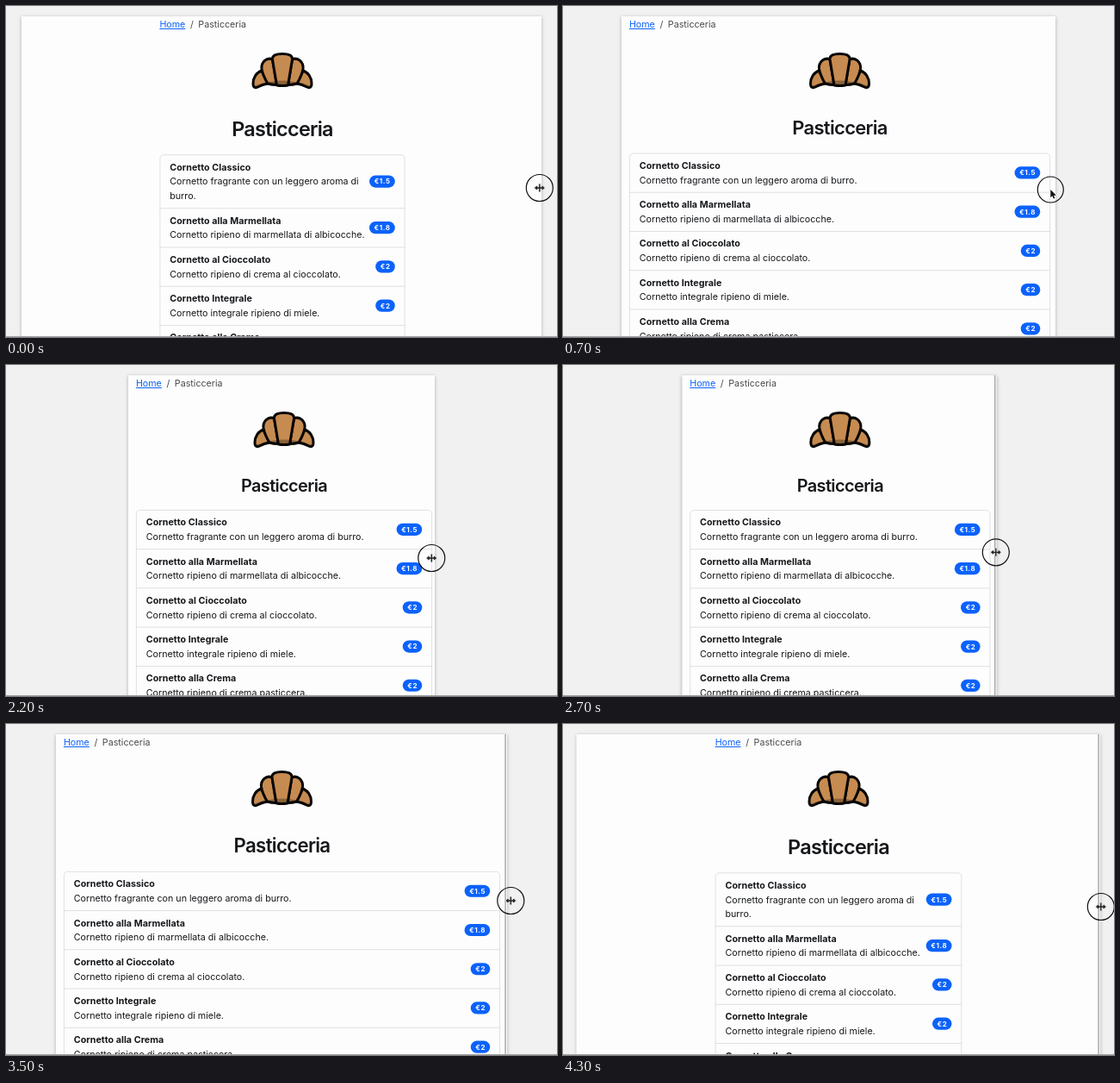
An HTML page with a canvas for the animation above (4.4 s loop, 640 by 384 pixels).

```html
<!DOCTYPE html>
<html lang="it">
<head>
<meta charset="utf-8">
<title>Pasticceria</title>
<style>
  html, body { margin: 0; width: 100%; height: 100%; overflow: hidden; background: #f1f1f1; }
  canvas { display: block; }
</style>
</head>
<body>
<canvas id="stage" width="640" height="384"></canvas>
<script>
const ctx = document.getElementById('stage').getContext('2d');
const LOOP = 4400, STEP = 100;
const SCALE = 0.696;               // page zoom: one CSS pixel of the page on stage
const rem = n => n * 16 * SCALE;
const GLYPH = 0.96;                // glyph size relative to the layout's font size
const BREAKPOINT = 768 * SCALE;
const BLUE = '#0b62fb', INK = '#15171a', MUTED = '#46494d', LINE = '#dee0e3';

const ITEMS = [
  ['Cornetto Classico', 'Cornetto fragrante con un leggero aroma di burro.', '€1.5'],
  ['Cornetto alla Marmellata', 'Cornetto ripieno di marmellata di albicocche.', '€1.8'],
  ['Cornetto al Cioccolato', 'Cornetto ripieno di crema al cioccolato.', '€2'],
  ['Cornetto Integrale', 'Cornetto integrale ripieno di miele.', '€2'],
  ['Cornetto alla Crema', 'Cornetto ripieno di crema pasticcera.', '€2']
];

// time, window left, window right, content right, cursor x, cursor y
const KEYS = [
  [0, 18, 622, 624, 619.5, 211],
  [600, 55.5, 584, 587, 577, 212],
  [700, 68, 572, 575, 566, 213],
  [1200, 83, 554, 557, 557, 214],
  [1300, 83, 554, 557, 557, 214],
  [1400, 83, 554, 557, 554, 215],
  [1700, 91.5, 546, 549, 548, 216],
  [1900, 91.5, 546, 549, 548, 216],
  [2200, 142, 498, 504, 494, 224],
  [2500, 160, 481, 485, 477, 222],
  [3100, 95, 543, 546, 553.5, 208],
  [3500, 58, 580, 583, 586, 205],
  [3700, 43.5, 595, 598, 598, 207],
  [4300, 15.5, 622, 624.5, 624.5, 212]
];

function poseAt(t) {
  const i = Math.max(1, KEYS.findIndex(k => k[0] >= t));
  const a = KEYS[i - 1], b = KEYS[i];
  const p = (t - a[0]) / (b[0] - a[0]);
  const [, left, right, contentRight, x, y] = a.map((v, n) => v + (b[n] - v) * p);
  return { left, right, contentRight, x, y };
}

function setFont(weight, size, tracking = 0) {
  ctx.font = `${weight} ${size * GLYPH}px Inter, Roboto, sans-serif`;
  ctx.letterSpacing = `${tracking * size}px`;
}
const bodyFont = () => setFont(400, rem(1));
const boldFont = () => setFont(700, rem(1), 0.004);
const badgeFont = () => setFont(700, rem(0.75), 0.07);

function text(str, x, y, color = INK) {
  ctx.fillStyle = color;
  ctx.fillText(str, x, y);
}

function wrap(str, width) {
  const lines = [];
  let line = '';
  for (const word of str.split(' ')) {
    const next = line ? line + ' ' + word : word;
    if (line && ctx.measureText(next).width > width) {
      lines.push(line);
      line = word;
    } else line = next;
  }
  return [...lines, line];
}

function drawWindow({ left, right }, edge) {
  ctx.save();
  ctx.shadowColor = 'rgba(0,0,0,.28)';
  ctx.shadowBlur = 4;
  ctx.shadowOffsetY = 0.5;
  ctx.fillStyle = '#fdfdfd';
  ctx.fillRect(left, 12, right - left + (edge ? 2 : 0), 400);
  ctx.restore();
  if (edge) {
    ctx.fillStyle = '#a9a9a9';
    ctx.fillRect(right - 0.7, 12, 1.5, 372);
  }
}

function drawBreadcrumb(x) {
  const base = 25, gap = rem(0.5);
  bodyFont();
  const home = ctx.measureText('Home').width, slash = ctx.measureText('/').width;
  text('Home', x, base, BLUE);
  ctx.fillRect(x, base + 1, home, 1);
  text('/', x + home + gap, base, MUTED);
  text('Pasticceria', x + home + slash + 2 * gap, base, MUTED);
}

const WING = new Path2D('M-24 75C-30 77-34 83-34 90C-34 95-31 95.5-28 93.8C-25 92-22 90.8-17 90Z');
const SIDE = new Path2D('M-24 73C-25 65-18 59-11.5 62L-6.5 91.5C-11 91.5-14 91-17 90C-20 85-23 79-24 73Z');
const MIDDLE = new Path2D('M-6.5 92L-11.5 62C-12 57-7 55.5 0 55.5C7 55.5 12 57 11.5 62L6.5 92Q0 93-6.5 92Z');
const SHADE = new Path2D('M-36 94Q0 79 36 94V100H-36Z');

function drawPiece(path, flip) {
  ctx.save();
  ctx.scale(flip, 1);
  ctx.fillStyle = '#c68b50';
  ctx.fill(path);
  ctx.save();
  ctx.clip(path);
  ctx.fillStyle = '#8d6338';
  ctx.fill(SHADE);
  ctx.restore();
  ctx.lineWidth = 3;
  ctx.lineJoin = 'round';
  ctx.strokeStyle = '#080605';
  ctx.stroke(path);
  ctx.restore();
}

function drawCroissant(x) {
  ctx.save();
  ctx.translate(x, 0);
  for (const path of [WING, SIDE]) for (const flip of [1, -1]) drawPiece(path, flip);
  drawPiece(MIDDLE, 1);
  ctx.restore();
}

function badgeWidth(label) {
  badgeFont();
  return ctx.measureText(label).width + 1.3 * rem(0.75);
}

function drawBadge(label, right, y) {
  const size = rem(0.75), h = 1.7 * size, w = badgeWidth(label);
  ctx.fillStyle = BLUE;
  ctx.beginPath();
  ctx.roundRect(right - w, y - h / 2, w, h, h / 2);
  ctx.fill();
  text(label, right - w + 0.67 * size, y + 0.35 * size, '#fff');
}

function drawList(x, right, top) {
  const lineHeight = rem(1.5), pad = rem(1) + SCALE;
  let y = top;
  ctx.lineWidth = 1;
  ctx.strokeStyle = LINE;
  ctx.beginPath();
  ctx.roundRect(x + 0.5, top + 0.5, right - x - 1, 400, 4.2);
  ctx.stroke();
  ITEMS.forEach(([name, about, price], i) => {
    const room = right - x - 2 * pad - badgeWidth(price);
    bodyFont();
    const lines = wrap(about, room);
    const height = (lines.length + 1) * lineHeight + rem(1) + SCALE;
    const base = y + 18.5;
    if (i) {
      ctx.fillStyle = LINE;
      ctx.fillRect(x, y, right - x, 1);
    }
    lines.forEach((line, n) => text(line, x + pad, base + (n + 1) * lineHeight));
    boldFont();
    text(name, x + pad, base);
    drawBadge(price, right - pad, y + height / 2 + 0.3);
    y += height;
  });
}

function drawContent({ left, contentRight }) {
  const width = contentRight - left, center = (left + contentRight) / 2;
  const half = (width >= BREAKPOINT ? width / 4 : width / 2) - 8.9;
  const titleSize = rem(1.375) + 0.015 * width;
  drawBreadcrumb(center - half);
  drawCroissant(center);
  setFont(600, titleSize, -0.03);
  ctx.textAlign = 'center';
  text('Pasticceria', center, 127.4 + 0.95 * titleSize);
  ctx.textAlign = 'left';
  drawList(center - half, center + half, 143 + 1.2 * titleSize);
}

const POINTER = new Path2D('M0 0V9.2L2.1 7.3L3.5 10.6L5.1 9.9L3.7 6.7H6.6Z');
const RESIZE = new Path2D('M-4.5 0H4.5M0-4.5V4.5M-2.8-1.8L-4.8 0L-2.8 1.8M2.8-1.8L4.8 0L2.8 1.8');

function drawCursor({ x, y }, pointing) {
  ctx.save();
  ctx.translate(x + 0.3, y);
  ctx.lineWidth = 1.2;
  ctx.strokeStyle = '#111';
  ctx.beginPath();
  ctx.arc(0, 0, pointing ? 15 : 15.5, 0, 2 * Math.PI);
  ctx.stroke();
  const shape = pointing ? POINTER : RESIZE;
  ctx.lineWidth = pointing ? 1.4 : 3;
  ctx.strokeStyle = pointing ? 'rgba(255,255,255,.9)' : 'rgba(205,205,205,.8)';
  ctx.stroke(shape);
  if (pointing) {
    ctx.fillStyle = '#111';
    ctx.fill(shape);
  } else {
    ctx.lineWidth = 1.3;
    ctx.strokeStyle = '#222';
    ctx.stroke(shape);
  }
  ctx.restore();
}

function draw(t) {
  const pose = poseAt(t);
  const edge = (t >= 1300 && t < 2000) || t >= 2600;
  ctx.fillStyle = '#f1f1f1';
  ctx.fillRect(0, 0, 640, 384);
  drawWindow(pose, edge);
  drawContent(pose);
  ctx.fillStyle = '#a3a3a3';
  ctx.fillRect(0, 383, 640, 1);
  drawCursor(pose, t >= 600 && t < 1000);
}

function tick() {
  const t = performance.now() % LOOP;
  draw(Math.floor(t / STEP) * STEP);
  requestAnimationFrame(tick);
}
tick();
</script>
</body>
</html>
```
